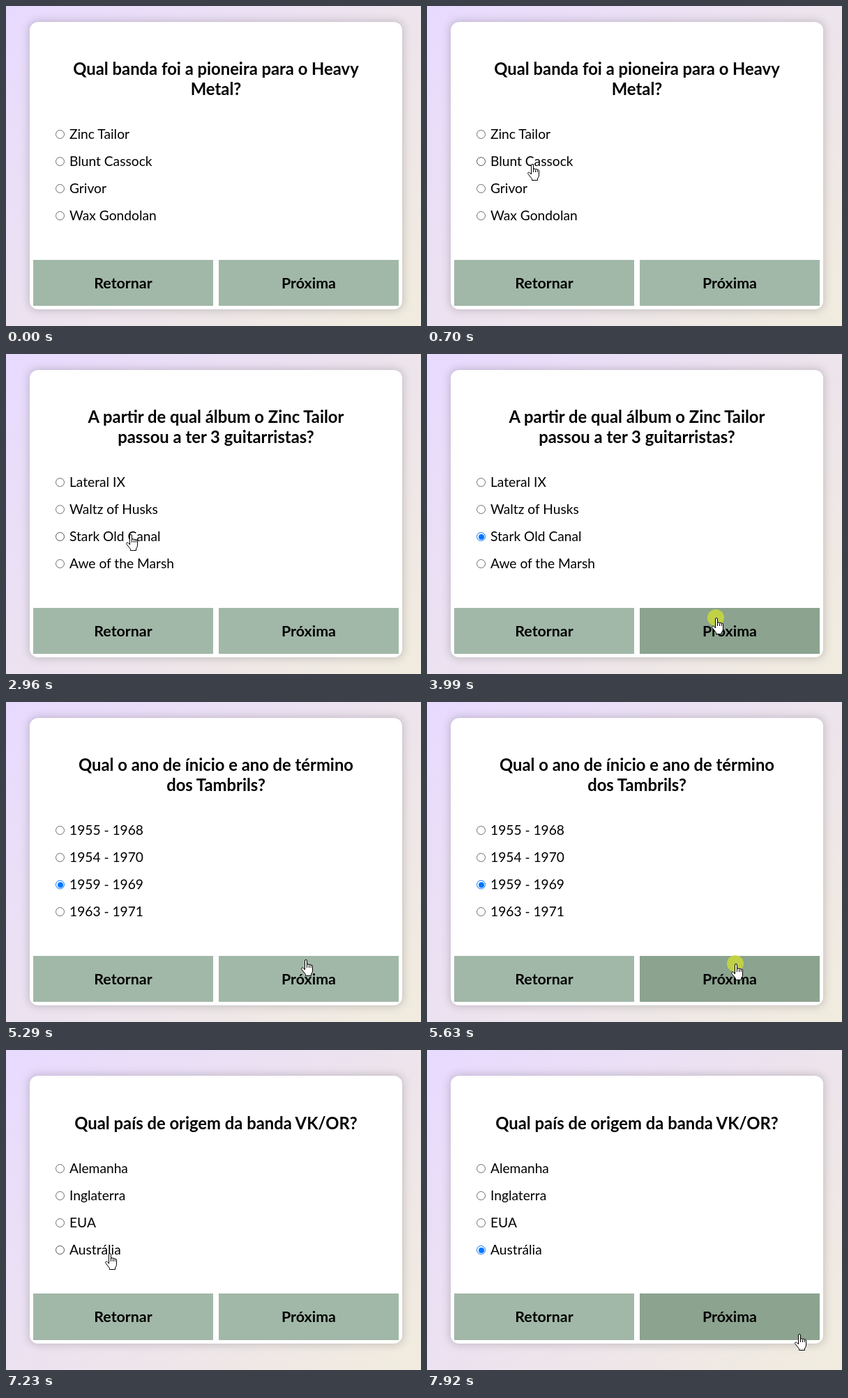
Animation, 595 px wide and 460 px high, one loop 8000 ms. Source, as an HTML page:

```html
<!DOCTYPE html>
<html lang="pt">
<head>
<meta charset="utf-8">
<style>
html, body { margin: 0; width: 595px; height: 460px; overflow: hidden; }
body {
  position: relative; color: #000; font-family: Lato, sans-serif;
  background: linear-gradient(135deg, #e8daff, #f1ecde);
}
.card {
  position: absolute; left: 34px; top: 23px; width: 534px; height: 413px;
  background: #fff; border-radius: 12px;
  box-shadow: 0 0 12px 2px rgba(90, 90, 90, .27);
}
.card.short { top: 37px; height: 385px; }
h2 {
  position: absolute; left: 0; top: 53px; width: 100%; margin: 0;
  font-size: 23.8px; line-height: 29px; font-weight: 700;
  text-align: center; white-space: pre;
}
.short h2 { top: 54px; }
#list { position: absolute; left: 37px; top: 149px; }
.short #list { top: 121px; }
.row {
  position: relative; width: max-content; height: 23px; margin-bottom: 16px;
  padding-left: 20px; font-size: 19.2px; line-height: 23px; white-space: pre;
}
.row i {
  position: absolute; left: 0; top: 6px; width: 13px; height: 13px;
  box-sizing: border-box; border: 1px solid #6c6c6c; border-radius: 50%;
}
.row.over i { border-color: #4f4f4f; }
.row.on i { border-color: #0075ff; }
.row.on i::after {
  content: ""; position: absolute; inset: 1.5px; border-radius: 50%; background: #0075ff;
}
.btn {
  position: absolute; top: 342px; bottom: 5px; width: 258px; background: #a1b8a8;
  font-size: 21.4px; line-height: 66px; font-weight: 700; text-align: center;
}
.short .btn { top: 313px; }
.btn.over { background: #8ba38f; }
#back { left: 5px; }
#next { left: 271px; }
#cursor { position: absolute; left: 0; top: 0; overflow: visible; }
#cursor path { fill: #fff; stroke: #000; stroke-linejoin: round; }
#cursor .lines { fill: none; }
</style>
</head>
<body>
<div class="card" id="card">
  <h2 id="title"></h2>
  <div id="list"></div>
  <div class="btn" id="back">Retornar</div>
  <div class="btn" id="next">Próxima</div>
</div>
<svg id="cursor" width="1" height="1">
  <circle id="ring" r="12" fill="rgba(208,222,50,.78)"/>
  <g id="hand" transform="translate(-6)">
    <path d="M5.5 15V2q0-1.5 1.5-1.5T8.5 2v6q.2-1.2 1.5-1.2T11.5 8.2q.2-1 1.4-1T14.2 9q.2-.8 1.2-.8T16.5 10v6q0 3-2 5v2.5h-8v-2L1 14.5q-.9-1.4 .2-2.2t2.3 .4z"/>
    <path class="lines" d="M8.5 8v4M11.5 8.5v3.5M14.2 9v3"/>
  </g>
  <path id="arrow" d="M.5 .5v16l3.7-3.5 2.5 5.8 2.3-1-2.5-5.6h5z"/>
</svg>
<script>
const LOOP = 8000, CLICK = 150, APPEAR = 70;
const HOVER_LAG = 70, PACE = 1.6, MIN_GLIDE = 200, LEAVE = 300;
const $ = id => document.getElementById(id);

// stops: where the pointer rests and when it gets there
// press: click on the chosen row; aim: point on the button; turn: click on it
const pages = [
  { title: "Qual banda foi a pioneira para o Heavy\nMetal?",
    rows: ["Zinc Tailor", "Blunt Cassock", "Grivor", "Wax Gondolan"],
    stops: [{ t: 710, x: 150, y: 227 }],
    pick: 1, press: 770, aim: { x: 486, y: 413 }, turn: 1450 },
  { title: "A partir de qual álbum o Zinc Tailor\npassou a ter 3 guitarristas?",
    rows: ["Lateral IX", "Waltz of Husks", "Stark Old Canal", "Awe of the Marsh"],
    stops: [{ t: 2090, x: 277, y: 281 }, { t: 2500, x: 172, y: 221 }, { t: 2950, x: 178, y: 259 }],
    pick: 2, press: 3240, aim: { x: 414, y: 379 }, turn: 3990 },
  { title: "Qual o ano de ínicio e ano de término\ndos Tambrils?",
    rows: ["1955 - 1968", "1954 - 1970", "1959 - 1969", "1963 - 1971"],
    stops: [{ t: 4720, x: 160, y: 257 }],
    pick: 2, press: 4880, aim: { x: 442, y: 376 }, turn: 5630 },
  { title: "Qual país de origem da banda VK/OR?", short: true,
    rows: ["Alemanha", "Inglaterra", "EUA", "Austrália"],
    stops: [{ t: 6320, x: 162, y: 190 }, { t: 6750, x: 148, y: 235 }, { t: 7230, x: 148, y: 292 }],
    pick: 3, press: 7300, aim: { x: 533, y: 408 }, turn: LOOP }
];

// Glides and clicks follow from the stops
const start = { x: 500, y: 419 }, glides = [], clicks = [];
let last = start, opens = 0;
for (const p of pages) {
  p.opens = opens;
  for (const s of p.stops) {
    const time = Math.max(MIN_GLIDE, PACE * Math.hypot(s.x - last.x, s.y - last.y));
    glides.push({ from: s.t - time, time, to: s });
    last = s;
  }
  glides.push({ from: p.press + CLICK, time: LEAVE, to: p.aim });
  last = p.aim;
  clicks.push(p.press, p.turn);
  opens = p.turn + CLICK;
}

function pointer(t) {
  let { x, y } = start;
  for (const { from, time, to } of glides) {
    if (t < from) break;
    const p = Math.min(1, (t - from) / time), e = p * p * (3 - 2 * p);
    x += (to.x - x) * e;
    y += (to.y - y) * e;
  }
  return { x: Math.round(x), y: Math.round(y) };
}

function inside(el, { x, y }) {
  const r = el.getBoundingClientRect();
  return x >= r.left && x < r.right && y >= r.top && y < r.bottom;
}

const show = (el, on) => { el.style.display = on ? "" : "none"; };
let page, rows = [];

function open(p) {
  page = p;
  $("card").classList.toggle("short", !!p.short);
  $("title").textContent = p.title;
  rows = p.rows.map(text => {
    const row = document.createElement("div");
    row.className = "row";
    row.append(document.createElement("i"), text);
    return row;
  });
  $("list").replaceChildren(...rows);
}

function draw(t) {
  const current = pages.filter(p => p.opens <= t).pop();
  if (current !== page) open(current);

  const pos = pointer(t), late = pointer(t - HOVER_LAG), seen = t >= APPEAR;
  const buttons = [$("back"), $("next")];
  const hot = [...rows, ...buttons].some(el => inside(el, pos));
  rows.forEach((row, i) => {
    row.classList.toggle("over", seen && inside(row, pos));
    row.classList.toggle("on", i === page.pick && t >= page.press + CLICK / 2);
  });
  for (const btn of buttons)
    btn.classList.toggle("over", t >= APPEAR + HOVER_LAG && inside(btn, late));

  show($("cursor"), seen);
  show($("hand"), hot);
  show($("arrow"), !hot);
  show($("ring"), clicks.some(c => t >= c && t < c + CLICK));
  $("cursor").style.transform = `translate(${pos.x}px, ${pos.y}px)`;
}

const begin = performance.now();
function tick() {
  draw((performance.now() - begin) % LOOP);
  requestAnimationFrame(tick);
}
tick();
</script>
</body>
</html>
```
